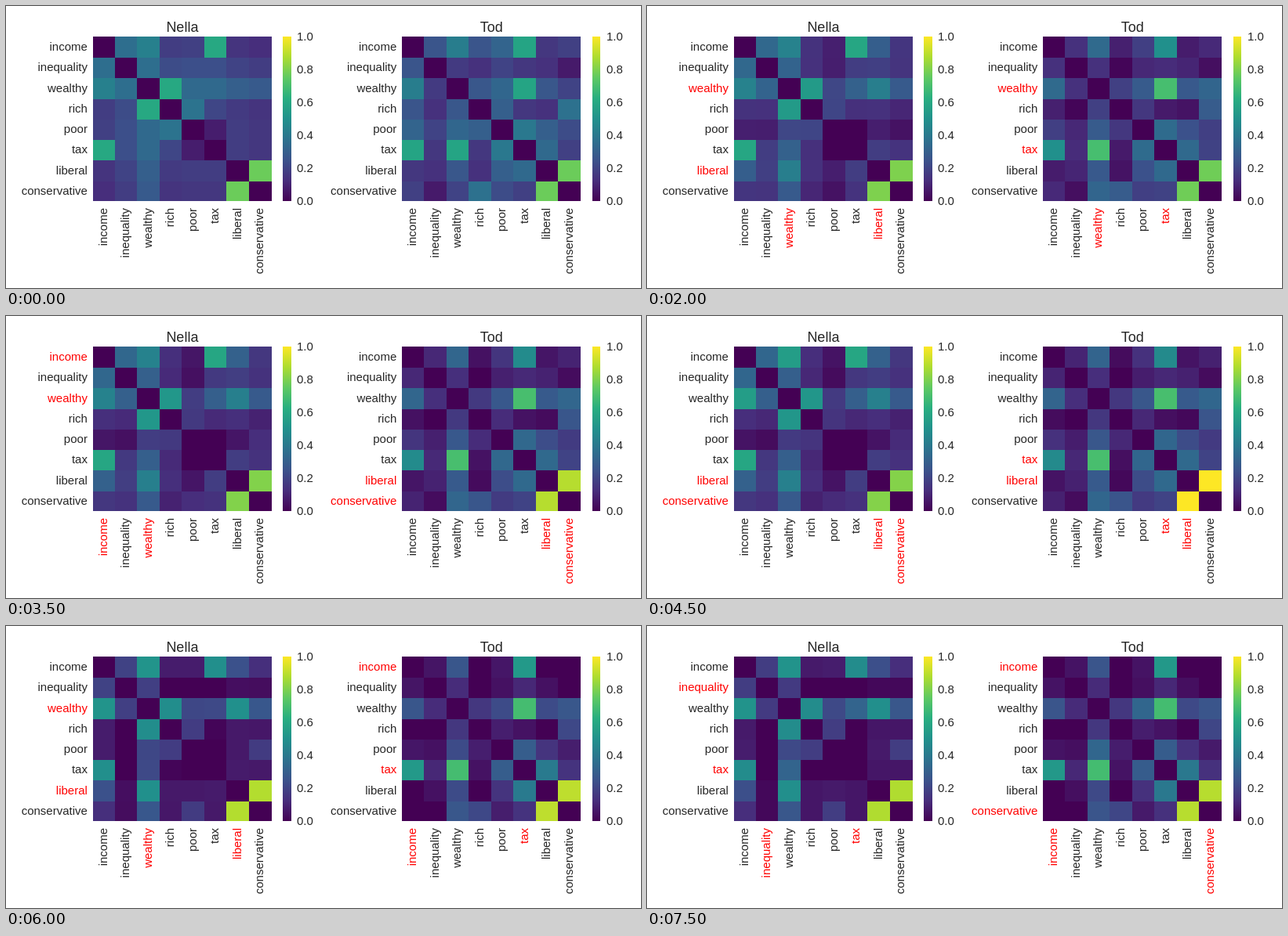
An HTML page for the animation above (8 s loop, 810 by 360 pixels).

```html
<!DOCTYPE html>
<html lang="en">
<head>
<meta charset="utf-8">
<title>Word similarity heatmaps</title>
<style>
  html, body { margin: 0; width: 100%; height: 100%; overflow: hidden; background: #fff; }
  svg { display: block; }
  text { font: 15px "Liberation Sans", Arial, sans-serif; fill: #262626; }
  text.title { font-size: 18px; text-anchor: middle; }
  text.name { text-anchor: end; }
  text.on { fill: #f00; }
  rect { shape-rendering: crispEdges; }
</style>
</head>
<body>
<svg id="stage" width="810" height="360" viewBox="0 0 810 360"></svg>
<script>
const LOOP = 8000, ROUND = 1000;
const LEFT = 110.9, PITCH = 394.4, TOP = 39.3, WIDTH = 228, HEIGHT = 210;
const BAR_GAP = 242.3, BAR_WIDTH = 10.5;
const WORDS = ['income', 'inequality', 'wealthy', 'rich', 'poor', 'tax', 'liberal', 'conservative'];
const N = WORDS.length;
const VIRIDIS = ['440154', '472d7b', '3b528b', '2c728e', '21918c', '28ae80', '5ec962', 'addc30', 'fde725'];

// A cell is the sum of its two words' weights, plus the pair's link,
// plus GAIN for every time the pair was lit, all in percent.
const GAIN = 11;
const KEY_ROUNDS = [0, 4, 7];

const PANELS = [
  {
    title: 'Nella',
    weights: [
      [8, 13, 23, 10, 11, 11, 7, 5],
      [10, 8, 22, 3, -5, 8, 10, 6],
      [7, -4, 21, 0, 1, 0, 6, 6]
    ],
    links: { '01': 15, '02': 12, '05': 41, 23: 27, 34: 17, 45: -14, 67: 65 },
    lit: ['06', '26', '47', '02', '67', '26', '25', '15']
  },
  {
    title: 'Tod',
    weights: [
      [14, 2, 15, 12, 18, 14, 12, 5],
      [3, -3, 16, 0, 11, 14, 12, 6],
      [-2, -3, 15, 1, 7, 14, 7, 0]
    ],
    links: { '01': 10, '02': 13, '05': 30, '06': -10, 25: 29, 35: -10, 36: -10, 37: 20, 45: 8, 56: 8, 67: 60 },
    lit: ['27', '25', '67', '67', '56', '05', '24', '07']
  }
];

const stage = document.getElementById('stage');

function add(tag, attrs, parent = stage, text = '') {
  const node = document.createElementNS('http://www.w3.org/2000/svg', tag);
  for (const key in attrs) node.setAttribute(key, attrs[key]);
  node.textContent = text;
  parent.append(node);
  return node;
}

const mix = (a, b, u) => a + (b - a) * u;
const easeOut = u => u * (2 - u);
const channels = hex => [0, 2, 4].map(i => parseInt(hex.slice(i, i + 2), 16));

function viridis(value) {
  const pos = Math.min(1, Math.max(0, value)) * (VIRIDIS.length - 1);
  const k = Math.min(VIRIDIS.length - 2, Math.floor(pos));
  const a = channels(VIRIDIS[k]), b = channels(VIRIDIS[k + 1]);
  return `rgb(${a.map((c, i) => Math.round(mix(c, b[i], pos - k)))})`;
}

function weightsAt(weights, round) {
  const k = round < KEY_ROUNDS[1] ? 0 : 1;
  const u = easeOut((round - KEY_ROUNDS[k]) / (KEY_ROUNDS[k + 1] - KEY_ROUNDS[k]));
  return weights[k].map((w, i) => mix(w, weights[k + 1][i], u));
}

function similarity({ links, lit }, weights, round, i, j) {
  if (i === j) return 0;
  const pair = `${Math.min(i, j)}${Math.max(i, j)}`;
  const times = lit.slice(0, round).filter(p => p === pair).length;
  return (weights[i] + weights[j] + (links[pair] || 0) + GAIN * times) / 100;
}

function buildBar(x) {
  const left = Math.round(x), right = Math.round(x + BAR_WIDTH);
  add('rect', { x: left, y: 39, width: right - left, height: HEIGHT, fill: 'url(#scale)' });
  for (let i = 0; i <= 5; i++) {
    const y = Math.round(TOP + HEIGHT * (1 - i / 5) + 5);
    add('text', { x: Math.round(x + BAR_WIDTH + 7.5), y }, stage, (i / 5).toFixed(1));
  }
}

function buildPanel(panel, index) {
  const x = LEFT + PITCH * index;
  const colEdge = i => i % N ? Math.floor(x + WIDTH * i / N) : Math.round(x + WIDTH * i / N);
  const rowEdge = i => i % N ? Math.ceil(TOP + HEIGHT * i / N) : Math.round(TOP + HEIGHT * i / N);

  add('text', { class: 'title', x: x + WIDTH / 2, y: 33 }, stage, panel.title);
  const cells = WORDS.map((_, i) => WORDS.map((_, j) => add('rect', {
    x: colEdge(j), y: rowEdge(i),
    width: colEdge(j + 1) - colEdge(j), height: rowEdge(i + 1) - rowEdge(i)
  })));
  const names = WORDS.map((word, i) => {
    const mid = (i + 0.5) / N;
    const baseX = Math.floor(x + WIDTH * mid + 4.2);
    return [
      add('text', { x: x - 7, y: Math.round(TOP + HEIGHT * mid + 4.6) }, stage, word),
      add('text', { transform: `translate(${baseX} 258) rotate(-90)` }, stage, word)
    ];
  });
  buildBar(x + BAR_GAP);

  return (round, litCount) => {
    const weights = weightsAt(panel.weights, round);
    const lit = litCount ? panel.lit[litCount - 1] : '';
    cells.forEach((row, i) => row.forEach((cell, j) =>
      cell.setAttribute('fill', viridis(similarity(panel, weights, round, i, j)))));
    names.forEach((both, i) => both.forEach(name =>
      name.setAttribute('class', lit.includes(i) ? 'name on' : 'name')));
  };
}

const scale = add('linearGradient', { id: 'scale', x1: 0, y1: 1, x2: 0, y2: 0 }, add('defs', {}));
VIRIDIS.forEach((hex, i) =>
  add('stop', { offset: i / (VIRIDIS.length - 1), 'stop-color': '#' + hex }, scale));

const painters = PANELS.map(buildPanel);
const origin = performance.now();
let shown = -1;

// Names light up half a round before the cells respond.
function draw(now) {
  const t = Math.max(0, now - origin) % LOOP;
  const half = Math.floor(t / (ROUND / 2));
  if (half !== shown) {
    shown = half;
    painters.forEach(paint => paint(Math.floor(half / 2), Math.ceil(half / 2)));
  }
  requestAnimationFrame(draw);
}
draw(origin);
</script>
</body>
</html>
```
